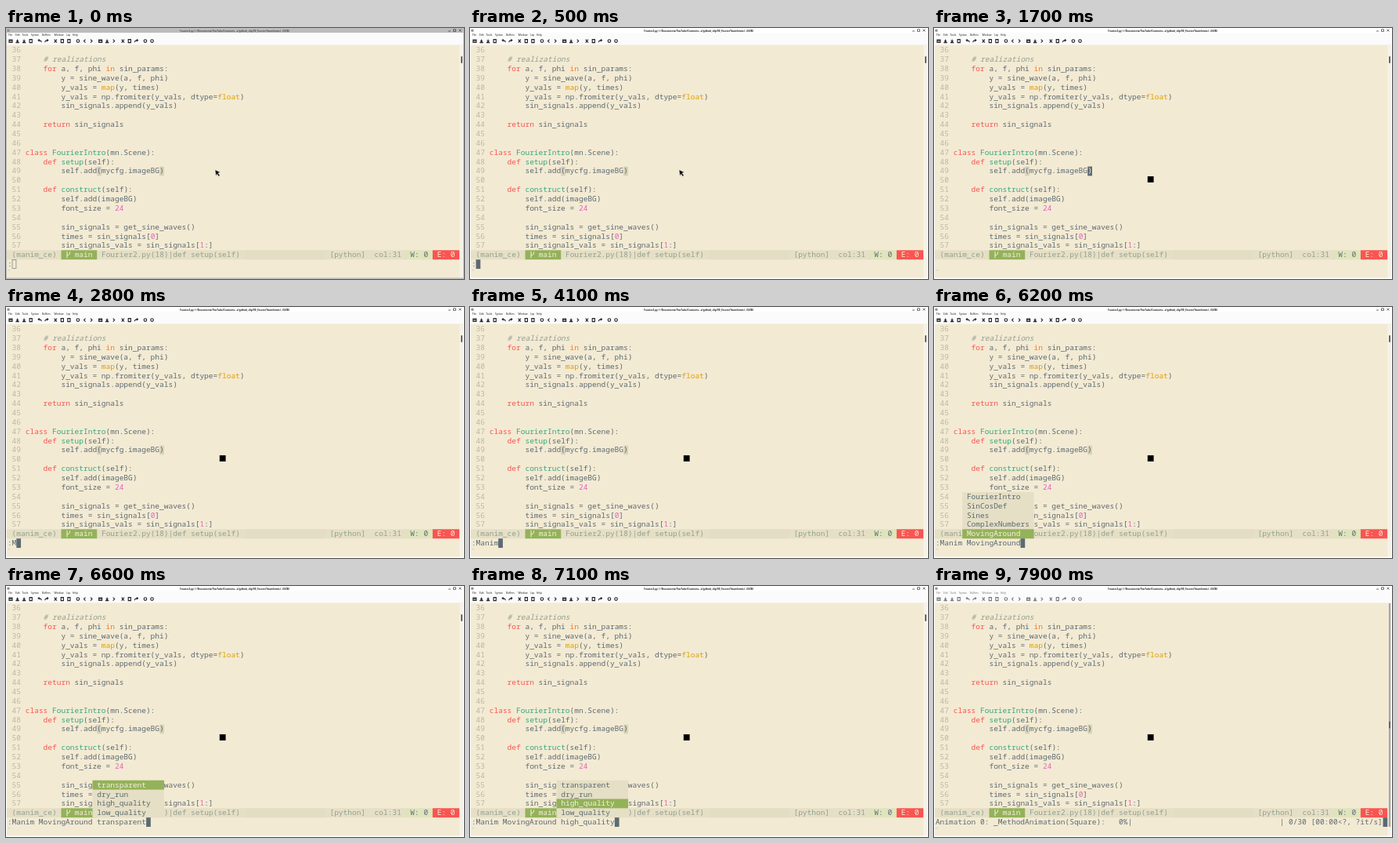
Animation of 585 by 320 pixels, one loop 8 s. Source, as an HTML page:

```html
<!DOCTYPE html>
<html lang="en">
<head>
<meta charset="utf-8">
<title>Editor session</title>
<style>
  html, body { margin: 0; width: 100%; height: 100%; overflow: hidden; background: #f3ead3; }
  svg { display: block; width: 585px; height: 320px; }
  text { white-space: pre; fill: #5c6a72; font: 9.53px "Noto Sans Mono", "DejaVu Sans Mono", monospace; }
  .ui text { font: 3.2px "Noto Sans", "Open Sans", sans-serif; fill: #222; }
  .ui .title { font-size: 3.1px; font-weight: 700; text-anchor: middle; }
  .num { fill: #bbb9a3; }
  .key { fill: #f85552; }
  .op { fill: #f57d26; }
  .fn { fill: #35a77c; }
  .type { fill: #dfa000; }
  .val { fill: #df69ba; }
  .note { fill: #939f91; font-style: italic; }
  .dim { fill: #939f91; }
  .lit { fill: #f8f0dc; }
  #icons path { fill: none; stroke: #222; stroke-width: 1.1; }
  .frame { fill: #fff; animation: focus 8s infinite; }
  @keyframes focus {
    0%, 1.25% { fill: #bcbcbc; animation-timing-function: steps(5, start); }
    6.25%, 100% { fill: #fff; }
  }
</style>
</head>
<body>
<svg viewBox="0 0 585 320" xmlns="http://www.w3.org/2000/svg">
  <rect width="585" height="320" fill="#f3ead3"/>
  <g class="ui">
    <rect width="585" height="21.5" fill="#fbfbfb"/>
    <rect class="frame" width="585" height="6"/>
    <rect x="1.5" y="1.7" width="3" height="3" fill="#7b9a78"/>
    <text class="title" id="title" x="292" y="4.5">Fourier2.py (~/Documents/YouTube/Contents...e/github_clip/90_FourierTransforms) - GVIM</text>
    <path d="M565 4h3M571.5 1.8h3v2.6h-3zM578.6 1.7l2.8 2.8m0-2.8l-2.8 2.8" fill="none" stroke="#333" stroke-width=".7"/>
    <g id="menu"></g>
    <g id="icons"></g>
  </g>
  <g id="code"></g>
  <g id="status"></g>
  <rect x="2" y="308.5" width="3.4" height=".7" fill="#cbc6ae"/>
  <rect x="579.5" y="21.5" width="5.5" height="298" fill="#f5f2ea"/>
  <rect id="trough" x="580.8" y="22" width="2.4" height="285" fill="#aaa79d"/>
  <rect id="thumb" x="581" width="2" height="9" rx="1" fill="#666"/>
  <path class="frame" d="M0 0h1v318.6h583V0h1v320H0z"/>
  <g id="popup"></g>
  <g id="cmd"></g>
  <path id="arrow" d="M267 180.8l6.8 3.3-2.9 1 2.3 2.8-1.5 1.3-2.2-2.9-1.3 2.4z" fill="#111" stroke="#fff" stroke-width=".4"/>
  <rect id="block" x="272.8" y="189.1" width="7.8" height="7.8" fill="#000"/>
</svg>
<script>
const LOOP = 8000, CW = 5.716, RH = 11.86, STATUS = 22, CMD = 23;
const INK = '#5c6a72', GREEN = '#93b259', PANEL = '#e5dfc5';
const $ = id => document.getElementById(id);
const colX = c => 1.9 + c * CW;
const rowY = r => 22.4 + r * RH;
const esc = s => s.replace(/&/g, '&amp;').replace(/</g, '&lt;');

const put = (col, row, s, cls = '') =>
  `<text class="${cls}" x="${colX(col).toFixed(2)}" y="${(rowY(row) + 8.9).toFixed(2)}">${s}</text>`;
const cell = (col, row, cols, rows, fill) =>
  `<rect x="${colX(col)}" y="${rowY(row)}" width="${cols * CW}" height="${rows * RH}" fill="${fill}"/>`;

// Markup: {k:word} colours a word with the class for k
const CLS = { k: 'key', o: 'op', f: 'fn', t: 'type', v: 'val', c: 'note' };
const paint = s => s.replace(/\{(\w):([^}]*)\}/g, (_, k, w) => `<tspan class="${CLS[k]}">${w}</tspan>`);

const SOURCE = `
    {c:# realizations}
    {k:for} a, f, phi {o:in} sin_params:
        y = sine_wave(a, f, phi)
        y_vals = {t:map}(y, times)
        y_vals = np.fromiter(y_vals, dtype={t:float})
        sin_signals.append(y_vals)

    {k:return} sin_signals


{k:class} {f:FourierIntro}(mn.Scene):
    {k:def} {f:setup}(self):
        self.add(mycfg.imageBG)

    {k:def} {f:construct}(self):
        self.add(imageBG)
        font_size = {v:24}

        sin_signals = get_sine_waves()
        times = sin_signals[{v:0}]
        sin_signals_vals = sin_signals[{v:1}:]`.split('\n');

$('code').innerHTML =
  cell(20, 13, 1, 1, '#d8d3ba') +
  `<g id="match">${cell(34, 13, 1, 1, '#d8d3ba')}</g>` +
  `<g id="caret">${cell(34, 13, 1, 1, INK)}</g>` +
  SOURCE.map((s, i) => put(1, i, 36 + i, 'num') + put(4, i, paint(s))).join('') +
  `<g id="caretText">${put(34, 13, ')', 'lit')}</g>`;

$('status').innerHTML =
  `<rect y="${rowY(STATUS)}" width="579.2" height="${RH}" fill="${PANEL}"/>` +
  cell(53, STATUS, 18, 1, '#e3ddc4') +
  cell(12, STATUS, 8, 1, GREEN) +
  cell(89, STATUS, 6, 1, '#e0e4bd') +
  cell(95, STATUS, 6, 1, '#f85552') +
  '<path d="M78 285v8.4M81.6 285.4v1.6q0 2-3.6 3" fill="none" stroke="#f8f0dc" stroke-width="1"/>' +
  put(1, STATUS, '(manim_ce)', 'dim') +
  put(15, STATUS, 'main', 'lit') +
  put(21, STATUS, 'Fourier2.py(18)|def setup(self)', 'dim') +
  put(72, STATUS, '[python]', 'dim') +
  put(82, STATUS, 'col:31', 'dim') +
  put(90, STATUS, 'W: 0') +
  put(96, STATUS, 'E: 0', 'lit');

const MENU = { File: 3, Edit: 12, Tools: 20.5, Syntax: 32, Buffers: 46, Window: 61.5, Lsp: 77, Help: 85 };
$('menu').innerHTML = Object.entries(MENU).map(([s, x]) => `<text x="${x}" y="10.3">${s}</text>`).join('');

const GLYPH = {
  box: 'M-2-1.5h4v3.4h-4zM-2 .2h4', tray: 'M0-2v3M-1.4-.2L0 1.2 1.4-.2M-2.2 2h4.4',
  page: 'M-1.6-2h3.2v4h-3.2z', undo: 'M2 1.6Q2-1-2-1M-.6-2.2L-2-1-.6.4', redo: 'M-2 1.6Q-2-1 2-1M.6-2.2L2-1 .6.4',
  cut: 'M-1.6-2L1.6 2M1.6-2L-1.6 2', next: 'M-1-2L1 0-1 2', prev: 'M1-2L-1 0 1 2',
  ring: 'M-1.8 0a1.8 1.8 0 1 0 3.6 0a1.8 1.8 0 1 0-3.6 0'
};
const BAR = ['box tray tray page', 'undo redo', 'cut page page', 'ring prev next',
  'box tray next', 'cut page redo', 'ring ring'];
let x = 6, icons = '';
for (const group of BAR) {
  for (const name of group.split(' ')) {
    icons += `<path transform="translate(${x.toFixed(1)} 16.6)" d="${GLYPH[name]}"/>`;
    x += 8.55;
  }
  x += 3;
}
$('icons').innerHTML = icons;

const SCENES = { col: 6, cols: 16, items: ['FourierIntro', 'SinCosDef', 'Sines', 'ComplexNumbers', 'MovingAround'] };
const FLAGS = { col: 19, cols: 16, items: ['transparent', 'dry_run', 'high_quality', 'low_quality'] };

function popupMarkup({ col, cols, items }, pick) {
  const top = CMD - items.length;
  return cell(col, top, cols, items.length, PANEL) + cell(col, top + pick, cols, 1, GREEN) +
    items.map((s, i) => put(col + 1, top + i, s, i === pick ? 'lit' : '')).join('');
}

// Command line over time: [ms, text, popup list, picked row]
const steps = [[0, ':'], [1700, '']];
[2400, 2800, 3200, 3600, 3900, 4100, 4800].forEach((ms, i) => steps.push([ms, ':Manim '.slice(0, i + 1)]));
const browse = (base, list, times) =>
  times.forEach((ms, i) => steps.push([ms, base + list.items[i], list, i]));
browse(':Manim ', SCENES, [5100, 5600, 5800, 6000, 6200]);
steps.push([6400, ':Manim MovingAround ']);
browse(':Manim MovingAround ', FLAGS, [6500, 6900, 7100, 7300]);
steps.push([7500, ':Manim MovingAround low_quality']);
steps.push([7900, 'Animation 0: _MethodAnimation(Square):   0%|'.padEnd(77) + '| 0/30 [00:00<?, ?it/s]']);

const show = (id, on) => { $(id).style.display = on ? '' : 'none'; };
let last = '';

function render(t) {
  const [, text, list, pick] = steps.filter(s => s[0] <= t).pop();
  const normal = t >= 1700 && t < 2400;
  const busy = t >= 7500, running = t >= 7900;
  const hollow = t < 300, blink = t >= 1100 && t < 1300;
  const state = [text, pick, busy, hollow, blink].join();
  if (state === last) return;
  last = state;

  let cursor = '';
  if (hollow) {
    cursor = `<rect x="${colX(1) + .4}" y="${rowY(CMD) + .4}" width="${CW - .8}" height="${RH - .8}" fill="none" stroke="${INK}" stroke-width=".6"/>`;
  } else if (!normal && !blink) {
    cursor = cell(text.length, CMD, 1, 1, INK);
  }
  $('cmd').innerHTML = put(0, CMD, esc(text)) + cursor;
  $('popup').innerHTML = list ? popupMarkup(list, pick) : '';

  show('caret', normal);
  show('caretText', normal);
  show('match', !normal);
  show('arrow', t < 1700);
  show('block', t >= 1700);
  show('trough', running);
  $('thumb').setAttribute('y', running ? 172.5 : 36);
  $('title').style.opacity = hollow ? .7 : 1;
  $('menu').style.opacity = busy ? .6 : 1;
  $('icons').style.opacity = busy ? .6 : 1;
}

const fades = document.getAnimations();
const start = performance.now();
function tick() {
  const t = (performance.now() - start) % LOOP;
  fades.forEach(a => { a.currentTime = t; });
  render(t);
  requestAnimationFrame(tick);
}
tick();
</script>
</body>
</html>
```
